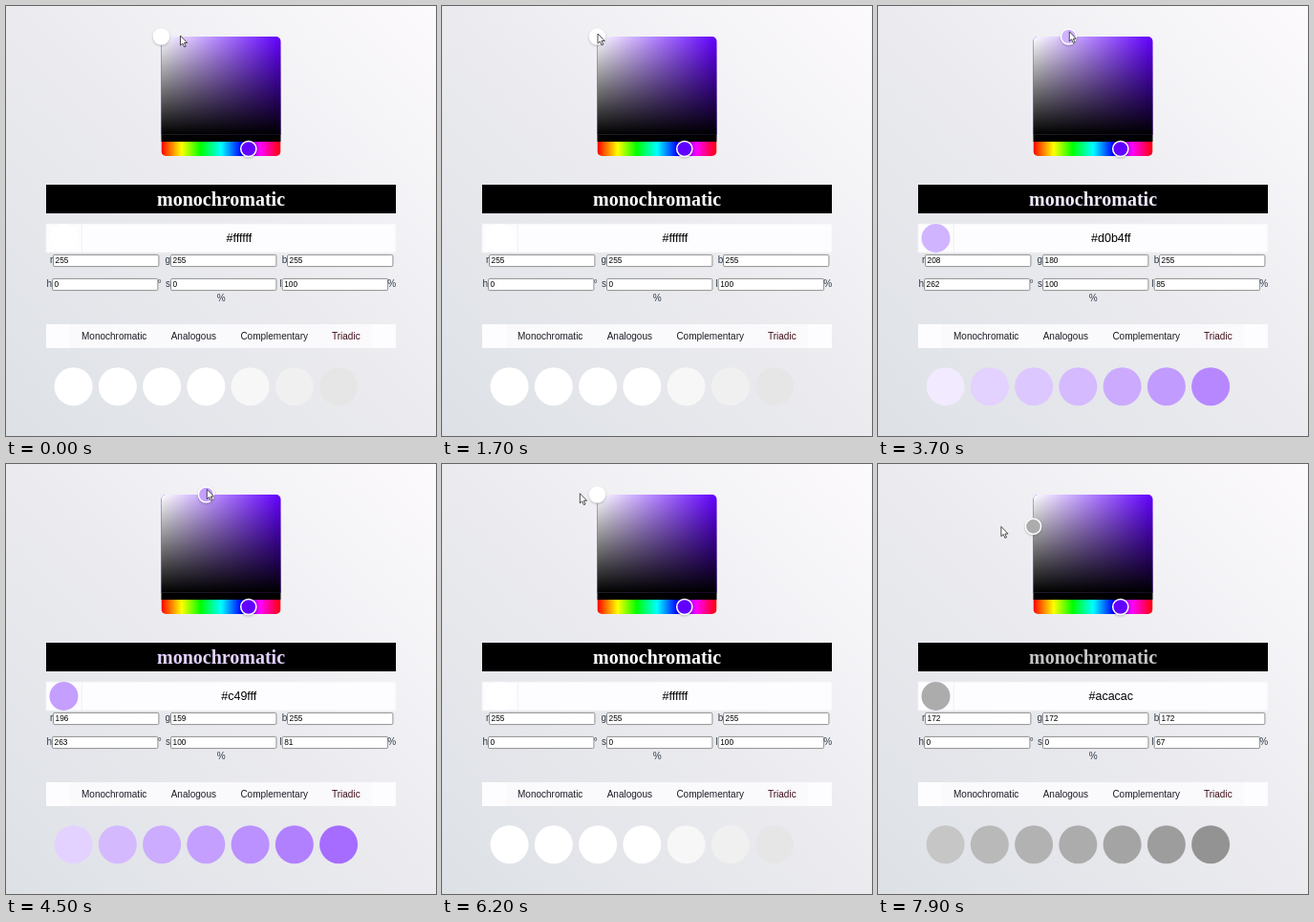
An HTML page that plays this animation: 450 px wide and 450 px high, repeating every 8 s.

```html
<!DOCTYPE html>
<html lang="en">
<head>
<meta charset="utf-8">
<title>Colour scheme picker</title>
<style>
  html, body { margin: 0; width: 100%; height: 100%; overflow: hidden; }
  body { background: linear-gradient(45deg, #dde1e6, #ebebef 50%, #fcfafd); }
  svg { display: block; width: 450px; height: 450px; }
  text { font: 10px "Liberation Sans", Arial, sans-serif; fill: #2f3a48; }
  #title { font: bold 20px "Liberation Serif", "Times New Roman", serif; }
  #hex { font-size: 12.5px; fill: #000; }
  .value { font-size: 8.33px; fill: #000; }
  .field { fill: #fff; stroke: #767676; stroke-width: .8; }
  .tab { fill: #1c1c26; }
  .panel { fill: #fdfcfe; }
  .knob { stroke: #fff; stroke-width: 1.5; filter: drop-shadow(0 1.2px 1.3px rgba(0, 0, 0, .22)); }
</style>
</head>
<body>
<svg viewBox="0 0 450 450">
  <defs>
    <linearGradient id="white">
      <stop stop-color="#fff"/><stop offset="1" stop-color="#fff" stop-opacity="0"/>
    </linearGradient>
    <linearGradient id="black" x2="0" y2="1">
      <stop stop-color="#000" stop-opacity="0"/><stop offset="1" stop-color="#000"/>
    </linearGradient>
    <linearGradient id="rainbow">
      <stop stop-color="#f00"/><stop offset=".17" stop-color="#ff0"/>
      <stop offset=".33" stop-color="#0f0"/><stop offset=".5" stop-color="#0ff"/>
      <stop offset=".67" stop-color="#00f"/><stop offset=".83" stop-color="#f0f"/>
      <stop offset="1" stop-color="#f00"/>
    </linearGradient>
    <clipPath id="round"><rect x="162.5" y="32" width="125" height="125" rx="5"/></clipPath>
  </defs>

  <g clip-path="url(#round)">
    <rect x="162" y="32" width="126" height="102.7" fill="hsl(263 100% 50%)"/>
    <rect x="162.5" y="32" width="125" height="102.7" fill="url(#white)"/>
    <rect x="162" y="32" width="126" height="102.7" fill="url(#black)"/>
    <rect x="162" y="134.5" width="126" height="7.5"/>
    <rect x="162.5" y="142" width="125" height="15" fill="url(#rainbow)"/>
  </g>
  <circle class="knob" cx="253.8" cy="149.5" r="8.1" fill="hsl(263 100% 50%)"/>
  <circle class="knob" id="knob" r="8.1"/>

  <rect x="42" y="187" width="366" height="30"/>
  <text id="title" x="225" y="209" text-anchor="middle">monochromatic</text>

  <rect class="panel" x="42" y="228" width="366" height="30" stroke="#f1f0f4" stroke-width=".7"/>
  <path d="M79.3 228V258" stroke="#f1f0f4"/>
  <circle id="swatch" cx="60.5" cy="243" r="15"/>
  <text id="hex" x="243.8" y="246.5" text-anchor="middle"></text>

  <g id="fields"></g>
  <text x="158.8" y="294">°</text>
  <text x="399.3" y="294">%</text>
  <text x="220.8" y="309">%</text>

  <rect class="panel" x="42" y="333" width="366" height="25"/>
  <rect x="67" y="333" width="316" height="25" fill="#faf9fb"/>
  <text class="tab" x="79" y="348.5">Monochromatic</text>
  <text class="tab" x="172.7" y="348.5">Analogous</text>
  <text class="tab" x="245.4" y="348.5">Complementary</text>
  <text class="tab" x="341" y="348.5" style="fill:#3c0d18">Triadic</text>

  <g id="dots"></g>
  <path id="cursor" d="M0 0V10.2L2.3 8.1 4 11.9 5.7 11.2 4 7.5H7.2Z" fill="#fff" stroke="#222" stroke-width=".8"/>
</svg>
<script>
const LOOP = 8000, STEP = 100;
const $ = id => document.getElementById(id);
const NS = "http://www.w3.org/2000/svg";

// Tracks: [time, value...]
const SATURATION = [[0, 0], [1850, 0], [2800, .216], [3100, .216], [4300, .376],
  [5100, .376], [5300, .34], [5500, .1294], [5800, 0]];
const BRIGHTNESS = [[0, 1], [6450, 1], [6700, .96], [6900, .902], [7300, .8], [7700, .6745]];
const CURSOR = [[0, 182.5, 31], [500, 172, 13], [900, 166, 18], [1500, 163, 29], [1850, 163, 29],
  [2800, 190.2, 27], [3100, 190.2, 27], [4300, 210.3, 26.5], [5100, 210.3, 26.5],
  [5300, 203, 26], [5500, 176.7, 23.7], [5900, 152, 27], [6450, 138, 34],
  [6900, 132.7, 44], [7300, 130.5, 54], [7700, 128.9, 65.5]];

const SHIFTS = [10, 5, 2.5, 0, -3, -6, -10];
const LAGS = [100, 100, 200, 200, 200, 200, 200];

function at(track, t) {
  const i = track.findIndex(k => k[0] > t);
  if (i < 0) return track[track.length - 1].slice(1);
  if (i === 0) return track[0].slice(1);
  const a = track[i - 1], b = track[i], p = (t - a[0]) / (b[0] - a[0]);
  return a.slice(1).map((v, n) => v + (b[n + 1] - v) * p);
}

function colorAt(t) {
  const [s] = at(SATURATION, t), [v] = at(BRIGHTNESS, t);
  const hue = t < 5000 ? 263 : 262.2;
  const rgb = [(hue - 240) / 60, 0, 1].map(c => Math.round(255 * v * (1 - s * (1 - c))));
  const [r, g, b] = rgb, span = b - g, sum = b + g;
  const hsl = [
    span ? 60 * (4 + (r - g) / span) : 0,
    span ? 100 * span / (sum > 255 ? 510 - sum : sum) : 0,
    sum / 5.1
  ];
  const hex = "#" + rgb.map(c => c.toString(16).padStart(2, "0")).join("");
  return { s, v, rgb, hsl, hex };
}

function add(parent, tag, attrs, text = "") {
  const el = document.createElementNS(NS, tag);
  for (const key in attrs) el.setAttribute(key, attrs[key]);
  el.textContent = text;
  return parent.appendChild(el);
}

const values = [
  ["r", 46, 49.5, 260], ["g", 166.5, 172.5, 260], ["b", 288.8, 294.5, 260],
  ["h", 42.5, 48.5, 285], ["s", 167, 172.5, 285], ["l", 286.3, 289.2, 285]
].map(([name, labelX, x, y]) => {
  add($("fields"), "text", { x: labelX, y: y + 9 }, name);
  add($("fields"), "rect", { class: "field", x, y: y + .4, width: 110.4, height: 12.2, rx: 1.4 });
  return add($("fields"), "text", { class: "value", x: x + 2, y: y + 9.4 });
});

const dots = SHIFTS.map((_, i) => add($("dots"), "circle", { cx: 70.6 + 46.25 * i, cy: 398.2, r: 20 }));

function shade(t, i) {
  const [h, s, l] = colorAt(Math.max(0, t - LAGS[i])).hsl;
  return `hsl(${h}, ${s}%, ${Math.min(100, l + SHIFTS[i])}%)`;
}

function draw(t) {
  const c = colorAt(t);
  $("knob").setAttribute("cx", 162.5 + 125 * c.s);
  $("knob").setAttribute("cy", 32 + 102.5 * (1 - c.v));
  $("knob").style.fill = $("swatch").style.fill = c.hex;
  $("hex").textContent = c.hex;
  [...c.rgb, ...c.hsl].forEach((n, i) => values[i].textContent = Math.round(n));
  dots.forEach((dot, i) => dot.style.fill = shade(t, i));
  $("title").style.fill = shade(t, 0);
  $("cursor").setAttribute("transform", `translate(${at(CURSOR, t)})`);
}

const start = performance.now();
function tick() {
  const t = (performance.now() - start) % LOOP;
  draw(Math.floor(t / STEP) * STEP);
  requestAnimationFrame(tick);
}
tick();
</script>
</body>
</html>
```
